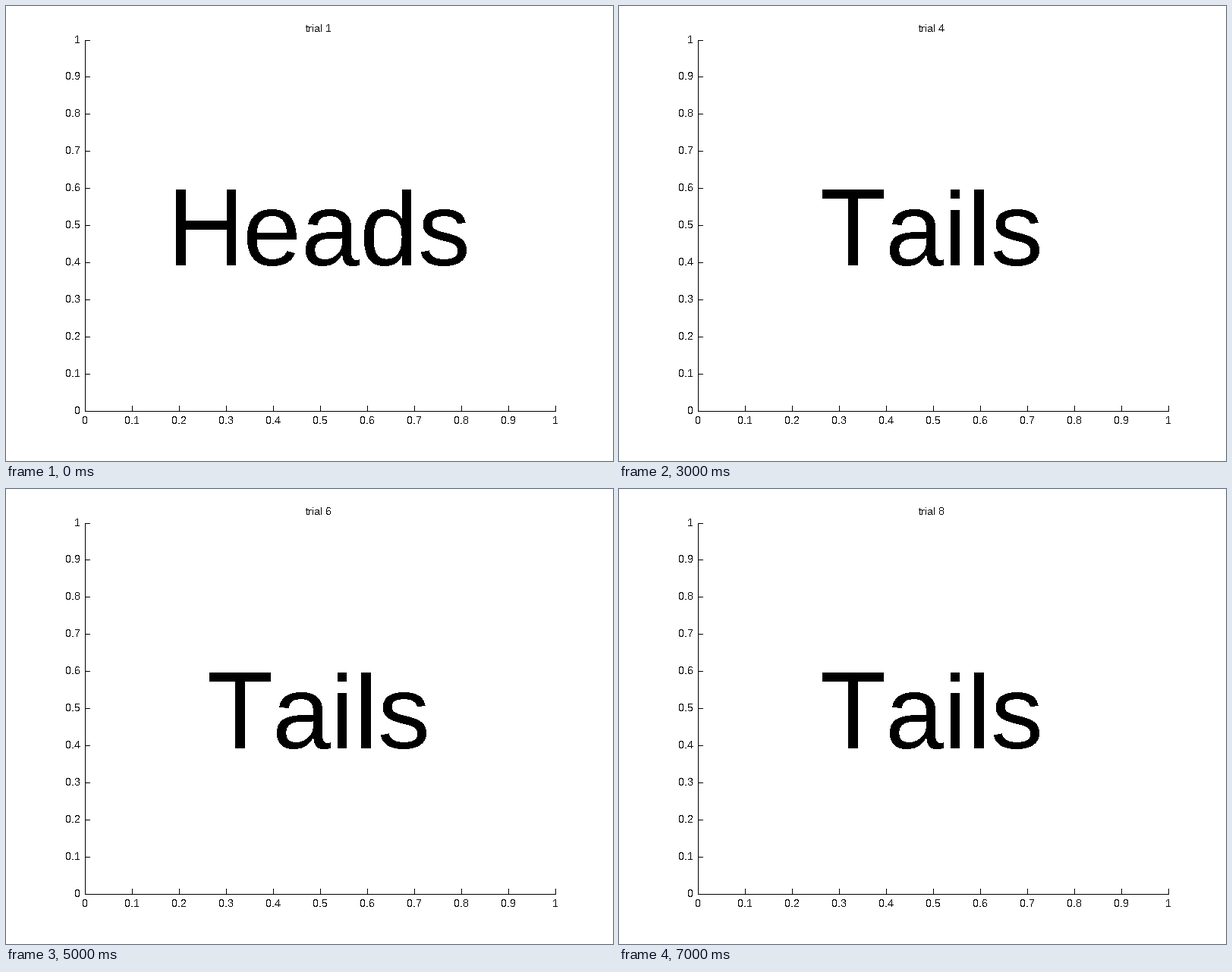
Recreate the animation shown at these times as a matplotlib script. Size 800 px wide and 600 px high, loop 8 s.

```python
import matplotlib.pyplot as plt
from matplotlib.animation import FuncAnimation
from matplotlib.patches import Rectangle

plt.rcParams.update({
    "toolbar": "None",
    "font.family": "Liberation Sans",
    "font.size": 10,
    "text.antialiased": False,
    "text.hinting": "default",
    "text.hinting_factor": 1,
})

W, H, DPI = 800, 600, 100
LEFT, BOTTOM, TOP = 104, 534, 45
BASELINE, BIG = 342, 99.4
TOSSES = "HHHTHTHT"

fig = plt.figure(figsize=(W / DPI, H / DPI), dpi=DPI, facecolor="white")
ax = fig.add_axes([0, 0, 1, 1])
ax.set_xlim(0, W)
ax.set_ylim(H, 0)
ax.axis("off")


def bar(x0, y0, x1, y1):
    """Solid black box between two pixel corners."""
    return ax.add_patch(Rectangle((x0, y0), x1 - x0, y1 - y0,
                                  fc="black", lw=0, antialiased=False))


def label(x, y, text, size=10):
    return ax.text(x, y, text, fontsize=size, color="black",
                   ha="left", va="baseline")


def draw_axes():
    bar(LEFT, TOP, LEFT + 1, BOTTOM + 1)
    bar(LEFT, BOTTOM, LEFT + 621, BOTTOM + 1)
    for k in range(11):
        text = f"{k / 10:g}"
        wide = len(text) > 1
        x = LEFT + 62 * k
        y = (10 * BOTTOM - 489 * k) // 10
        bar(x, BOTTOM - 7, x + 1, BOTTOM + 1)
        bar(LEFT, y, LEFT + 7, y + 1)
        label(x - (10 if wide else 4), 551, text)
        label(78 if wide else 90, y + 4, text)


draw_axes()
label(395, 34, "trial")
counter = label(421, 34, "")

# Tall capitals are built from bars, the remaining letters are text.
words = {
    "H": [bar(224, 242, 237, BASELINE),
          bar(291, 242, 303, BASELINE),
          bar(237, 283, 291, 295),
          label(312, BASELINE, "eads", BIG)],
    "T": [bar(268, 242, 349, 254),
          bar(302, 254, 315, BASELINE),
          label(351, BASELINE, "ails", BIG)],
}


def update(i):
    counter.set_text(str(i + 1))
    for side, parts in words.items():
        for part in parts:
            part.set_visible(side == TOSSES[i])
    return [counter, *words["H"], *words["T"]]


anim = FuncAnimation(fig, update, frames=len(TOSSES), interval=1000,
                     repeat=True, repeat_delay=0, blit=False)
plt.show()
```
